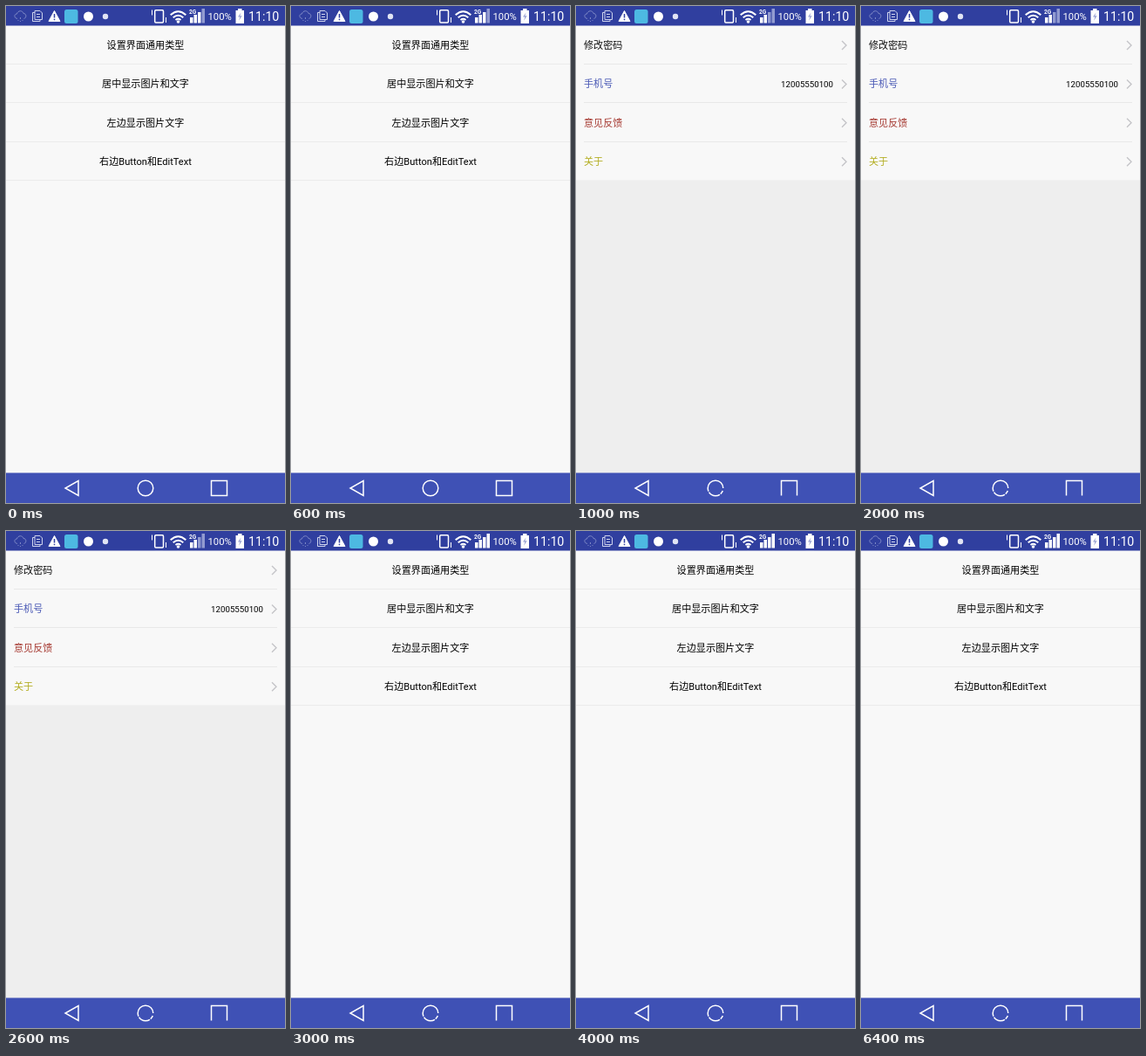
Write an HTML page that moves like this. It is 320 px wide and 569 px high and loops after 8 s.

```html
<!DOCTYPE html>
<html lang="zh-CN">
<head>
<meta charset="utf-8">
<title>Settings list</title>
<style>
  html, body { margin: 0; width: 100%; height: 100%; overflow: hidden; background: #f8f8f8; }
  svg { display: block; width: 100vw; height: 100vh; }
  text { font-family: Roboto, 'Noto Sans CJK SC', 'Noto Sans CJK', sans-serif; font-size: 11.1px; }
  .line { fill: none; stroke: #fff; }
</style>
</head>
<body>
<svg viewBox="0 0 320 569" preserveAspectRatio="none">
  <rect width="320" height="569" fill="#f8f8f8"/>
  <g id="menu"></g>
  <g id="settings">
    <rect y="199.5" width="320" height="336" fill="#eee"/>
  </g>

  <g id="status">
    <rect width="320" height="22.5" fill="#303f9f"/>
    <g class="line" style="stroke:#7d88c6">
      <path d="M13 14.5C9 14 9 9 12.5 9C13.5 5 19 4.5 20 8.5C23.5 8.5 24 13.5 20.5 14.5"/>
      <path d="M14 16v1M16.5 13v2M16.5 17v1M19 16v1"/>
    </g>
    <g class="line" style="stroke:#cdd2ec">
      <path d="M33 5.5h6l2.500 2.500v7.500h-8.500zM33 7.500h-2.500v10h8.500v-2M35 9.500h4M35 12.500h4"/>
    </g>
    <path d="M55.500 5.500L62 17.500H49z" fill="#fff" stroke="#fff" stroke-linejoin="round"/>
    <path d="M55.500 9v4.500M55.500 14.800v1.500" stroke="#303f9f" stroke-width="1.500"/>
    <rect x="67" y="4" width="15.500" height="16" rx="2.500" fill="#4db9e2"/>
    <circle cx="94.500" cy="12" r="5.500" fill="#fff"/>
    <circle cx="114" cy="12" r="3.200" fill="#e1e4f4"/>

    <rect class="line" x="170.700" y="4.700" width="9.800" height="14.200" rx="1.200" stroke-width="1.500"/>
    <path class="line" d="M167.500 4.500v6M183.500 13v6"/>
    <g class="line" stroke-width="2">
      <path d="M188.700 10.300Q197.500 2.300 206.300 10.300M191.700 13.300Q197.500 8.300 203.300 13.300M194.500 16Q197.500 13.600 200.500 16"/>
    </g>
    <circle cx="197.500" cy="18" r="1.800" fill="#fff"/>
    <text x="210" y="9" fill="#fff" style="font-size:6.500px;font-weight:700">2G</text>
    <g id="bars"></g>
    <text x="231.500" y="16.200" fill="#fff" style="font-size:11.300px">100%</text>
    <path d="M266 3h4.500v2h2.500v15h-9.500V5h2.500z" fill="#fff"/>
    <path d="M269.500 7.500l-3.500 5h2.300l-1.300 4.500 3.700-5.700h-2.400z" fill="#9aa3d3"/>
    <text x="278" y="17" fill="#fff" style="font-size:14.200px">11:10</text>
  </g>

  <g id="nav">
    <rect y="534.500" width="320" height="34.500" fill="#3f51b5"/>
    <g class="line" stroke-width="1.500">
      <path d="M83 543.500V560.500L68 552z"/>
      <circle id="home" cx="160" cy="552" r="8.800"/>
      <path id="recent" d="M235.500 560.500V543.500H253.500V560.500"/>
      <path id="base" d="M234.800 560.500H254.200"/>
    </g>
  </g>
</svg>
<script>
const NS = 'http://www.w3.org/2000/svg';
const byId = id => document.getElementById(id);

function add(parent, tag, attrs, content = '') {
  const node = document.createElementNS(NS, tag);
  for (const [key, value] of Object.entries(attrs)) node.setAttribute(key, value);
  node.textContent = content;
  parent.append(node);
  return node;
}

const ROW = 44.4;
const rowCenter = i => 45 + i * ROW;
const dividerY = i => Math.round(66 + i * ROW) + 0.5;

const menu = byId('menu');
['设置界面通用类型', '居中显示图片和文字', '左边显示图片文字', '右边Button和EditText'].forEach((label, i) => {
  add(menu, 'text', { x: 160, y: rowCenter(i) + 4, 'text-anchor': 'middle' }, label);
  add(menu, 'path', { d: `M0 ${dividerY(i)}H320`, stroke: '#ebebeb' });
});

const settings = byId('settings');
[['修改密码', '#111'], ['手机号', '#4a59b5'], ['意见反馈', '#a63a32'], ['关于', '#b3ad20']].forEach(([label, fill], i) => {
  const y = rowCenter(i);
  add(settings, 'text', { x: 9, y: y + 4, fill }, label);
  add(settings, 'path', { d: `M305 ${y - 5}l5 5l-5 5`, fill: 'none', stroke: '#c4c4c8', 'stroke-width': 1.4 });
  if (i < 3) add(settings, 'path', { d: `M9 ${dividerY(i)}H311`, stroke: '#e8e8e8' });
});
add(settings, 'text', { x: 295, y: rowCenter(1) + 3.7, 'text-anchor': 'end', style: 'font-size:9.7px' }, '12005550100');

const bars = [13, 10, 7, 3].map((y, i) =>
  add(byId('bars'), 'rect', { x: 211 + i * 4.5, y, width: 3.5, height: 19.5 - y }));

const scenes = [
  { at: 0, page: 'menu', signal: 3, idle: true },
  { at: 1000, page: 'settings', signal: 2 },
  { at: 3000, page: 'menu', signal: 4 }
];

function show({ page, signal, idle }) {
  menu.style.display = page === 'menu' ? '' : 'none';
  settings.style.display = page === 'settings' ? '' : 'none';
  bars.forEach((bar, i) => bar.setAttribute('fill', i < signal ? '#fff' : '#929bd0'));
  byId('base').style.display = idle ? '' : 'none';
  // Small gaps open at the lower right and lower left of the ring.
  byId('home').setAttribute('stroke-dasharray', idle ? 'none' : '0 3 4.5 1 14 1.2 31.6 0');
}

let current;
function tick() {
  const time = performance.now() % 8000;
  const scene = scenes.findLast(s => s.at <= time);
  if (scene !== current) show(current = scene);
  requestAnimationFrame(tick);
}
tick();
</script>
</body>
</html>
```
